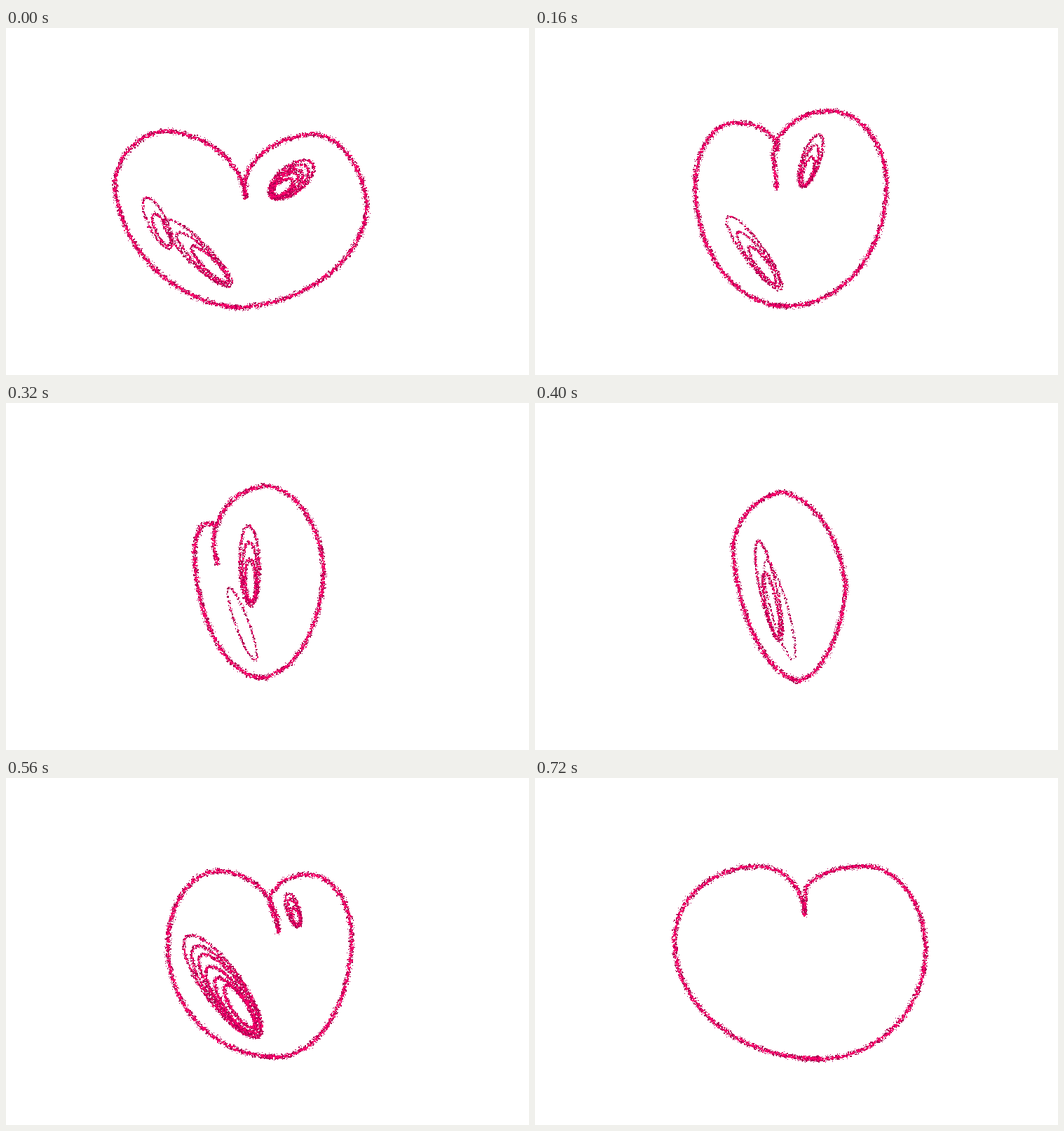
Write an HTML page with a canvas that moves like this. It is 746 px wide and 495 px high and loops after 800 ms.

```html
<!DOCTYPE html>
<html lang="en">
<head>
<meta charset="utf-8">
<title>Turning crayon heart</title>
<style>
  html, body { margin: 0; width: 100%; height: 100%; overflow: hidden; background: #fff; }
  canvas { display: block; }
</style>
</head>
<body>
<canvas id="stage" width="746" height="495"></canvas>
<script>
const WIDTH = 746, HEIGHT = 495, STEP_MS = 80, STEPS = 10;
const BRIGHT = '#f8006c', DARK = '#ac0050';

// A heart is given by its extremes; quarter arcs join them.
// join: where the left lobe ends. flat: how far the arcs lean to straight lines.
// scribbles: [x1, y1, x2, y2, half width, loops, weight]
const heart = (shape, ...scribbles) => ({ join: shape.tip, flat: 0, ...shape, scribbles });

const poses = {
  0: heart({ bottom: [332, 399], left: [155, 222], leftTop: [228, 147], tip: [342, 243],
    cleft: [341, 222], rightTop: [440, 151], right: [515, 258], flat: .12 },
    [437, 193, 377, 240, 19, 5, .9], [199, 242, 234, 314, 13, 2, .65],
    [226, 274, 321, 368, 16, 3, .65]),
  1: heart({ bottom: [366, 406], left: [202, 225], leftTop: [280, 131], tip: [370, 203],
    cleft: [371, 182], rightTop: [452, 128], right: [540, 228] },
    [438, 152, 411, 213, 10, 2, .55], [244, 238, 358, 378, 22, 4, .5]),
  3: heart({ bottom: [352, 388], left: [255, 225], leftTop: [290, 139], tip: [321, 258],
    cleft: [309, 190], rightTop: [388, 109], right: [463, 220], join: [323, 146] },
    [374, 153, 350, 241, 16, 3, .85], [306, 301, 344, 368, 7, 1, .65]),
  5: heart({ bottom: [375, 397], left: [282, 205], leftTop: [282, 205], tip: [282, 205],
    cleft: [282, 205], rightTop: [353, 127], right: [443, 262], flat: .2 },
    [318, 197, 349, 339, 12, 2, .7], [330, 225, 368, 366, 12, 1, .35]),
  7: heart({ bottom: [385, 398], left: [231, 240], leftTop: [303, 133], tip: [389, 220],
    cleft: [376, 178], rightTop: [432, 138], right: [493, 228] },
    [402, 165, 417, 212, 9, 3, .8], [258, 226, 361, 369, 27, 6, .85]),
  8: heart({ bottom: [380, 396], left: [214, 215], leftTop: [315, 131], tip: [399, 217],
    cleft: [385, 165], rightTop: [465, 131], right: [536, 220] },
    [445, 165, 430, 206, 14, 4, .9], [240, 238, 372, 366, 26, 7, .8]),
  9: heart({ bottom: [405, 401], left: [199, 232], leftTop: [318, 126], tip: [384, 195],
    cleft: [385, 165], rightTop: [470, 126], right: [557, 245] })
};

function midway(a, b) {
  if (typeof a === 'number') return (a + b) / 2;
  if (Array.isArray(a)) return a.map((v, i) => midway(v, b[i]));
  return Object.fromEntries(Object.keys(a).map(key => [key, midway(a[key], b[key])]));
}

const poseAt = step => poses[step] || midway(poses[step - 1], poses[step + 1]);

function randomSource(seed) {
  return () => {
    seed = (seed + 0x6D2B79F5) | 0;
    let n = Math.imul(seed ^ (seed >>> 15), seed | 1);
    n ^= n + Math.imul(n ^ (n >>> 7), n | 61);
    return ((n ^ (n >>> 14)) >>> 0) / 4294967296;
  };
}

// Quarter ellipse that leaves a horizontally or vertically.
function quarter(a, b, horizontal, flat) {
  const path = [];
  for (let k = 0; k <= 24; k++) {
    const t = k / 24, angle = t * Math.PI / 2;
    const fast = Math.sin(angle) * (1 - flat) + t * flat;
    const slow = (1 - Math.cos(angle)) * (1 - flat) + t * flat;
    path.push([
      a[0] + (b[0] - a[0]) * (horizontal ? fast : slow),
      a[1] + (b[1] - a[1]) * (horizontal ? slow : fast)
    ]);
  }
  return path;
}

function outlinePaths({ bottom, left, leftTop, join, tip, cleft, rightTop, right, flat }) {
  const leftSide = [
    ...quarter(bottom, left, true, flat),
    ...quarter(left, leftTop, false, flat),
    ...quarter(leftTop, join, true, flat)
  ];
  const rightSide = [
    tip,
    ...quarter(cleft, rightTop, false, flat),
    ...quarter(rightTop, right, true, flat),
    ...quarter(right, bottom, false, flat),
    ...leftSide.slice(0, 3) // the closing stroke overlaps its beginning
  ];
  return [leftSide, rightSide];
}

function loop(x1, y1, x2, y2, half) {
  const dx = x2 - x1, dy = y2 - y1, length = Math.hypot(dx, dy), path = [];
  for (let k = 0; k <= 40; k++) {
    const angle = k / 40 * Math.PI * 2;
    const along = (1 - Math.cos(angle)) / 2, side = Math.sin(angle) * half / length;
    path.push([x1 + dx * along + dy * side, y1 + dy * along - dx * side]);
  }
  return path;
}

function drawPose(step) {
  const layer = document.createElement('canvas');
  layer.width = WIDTH;
  layer.height = HEIGHT;
  const ctx = layer.getContext('2d');
  const random = randomSource(step * 977 + 31);
  const wobble = reach => (random() + random() - 1) * reach;

  function scatter(path, color, rate, reach, size) {
    ctx.fillStyle = color;
    for (let i = 1; i < path.length; i++) {
      const [x, y] = path[i - 1], dx = path[i][0] - x, dy = path[i][1] - y;
      const count = Math.floor(Math.hypot(dx, dy) * rate + random());
      for (let k = 0; k < count; k++) {
        const t = random();
        ctx.fillRect(Math.round(x + dx * t + wobble(reach) - size / 2),
          Math.round(y + dy * t + wobble(reach) - size / 2), size, size);
      }
    }
  }

  function crayon(path, weight, reach) {
    scatter(path, DARK, 2.2 * weight, reach, 1);
    scatter(path, DARK, .9 * weight, reach * .75, 2);
    scatter(path, BRIGHT, weight * weight, reach * .55, 2);
  }

  // Nested loops that crowd towards the second end and press harder there.
  function scribble([x1, y1, x2, y2, half, loops, weight]) {
    const count = Math.round(loops), dx = x2 - x1, dy = y2 - y1;
    for (let i = 0; i < count; i++) {
      const s = i / count, near = s * .6, far = 1 - s * .1, shake = 6 * s;
      const press = weight * (.75 + s * .5);
      crayon(loop(x1 + dx * near + wobble(shake), y1 + dy * near + wobble(shake),
        x1 + dx * far + wobble(shake), y1 + dy * far + wobble(shake),
        half * (1 - s * .7)), press, 1.5 + press * 3);
    }
  }

  const pose = poseAt(step);
  for (const path of outlinePaths(pose)) crayon(path, 1, 5.6);
  pose.scribbles.forEach(scribble);
  return layer;
}

const layers = Array.from({ length: STEPS }, (_, step) => drawPose(step));
const stage = document.getElementById('stage').getContext('2d');
const start = performance.now();

function render() {
  const step = Math.floor((performance.now() - start) / STEP_MS) % STEPS;
  stage.fillStyle = '#fff';
  stage.fillRect(0, 0, WIDTH, HEIGHT);
  stage.drawImage(layers[step], 0, 0);
  requestAnimationFrame(render);
}

render();
</script>
</body>
</html>
```
